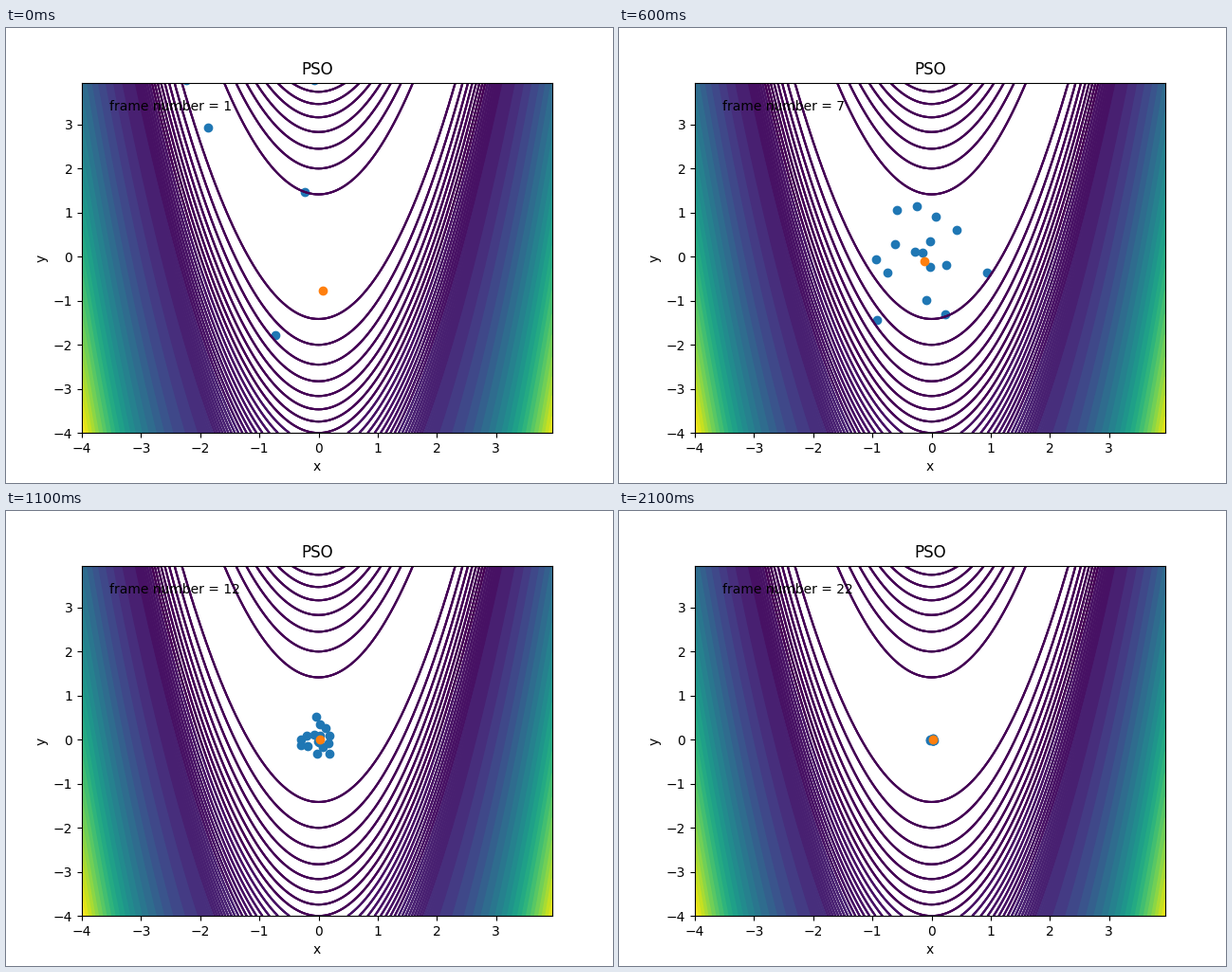
These frames come from a looping animation (640x480 px, 2200 ms). A matplotlib script:

```python
import matplotlib.pyplot as plt
import numpy as np
from matplotlib.animation import FuncAnimation

FRAMES, STEP_MS = 22, 100
SWARM = 16
INSIDE = [(-1.87, 2.93), (-.23, 1.46), (-.73, -1.78), (-2.24, 4.01), (-.07, 4.01)]

rng = np.random.default_rng(8)


def cost(x, y):
    return x**2 + 100 * (y - x**2)**2


def best_at(step):
    keys = [0, 4, 6, 9]
    return np.array([np.interp(step, keys, [.07, .25, -.12, .02]),
                     np.interp(step, keys, [-.77, -.02, -.10, 0])])


def start_swarm():
    # most particles begin outside the plot
    n = SWARM - len(INSIDE)
    angle = 2 * np.pi * (np.arange(n) + rng.random(n)) / n
    radius = rng.uniform(6, 10, n)
    ring = np.column_stack([radius * np.cos(angle), radius * np.sin(angle)])
    return np.vstack([INSIDE, ring])


offset = start_swarm() - best_at(0)
decay = rng.uniform([.70, .74], [.79, .82], (SWARM, 2))
swing = rng.uniform(1, 2.5, (SWARM, 2))


def swarm_at(step):
    """Every particle swings around the best point and settles on it."""
    return best_at(step) + offset * decay**step * np.cos(swing * step)


fig, ax = plt.subplots(figsize=(6.4, 4.8), dpi=100)
axis = np.arange(-4, 4, 0.05)
X, Y = np.meshgrid(axis, axis)
# stacked passes harden the line edges
for _ in range(3):
    ax.contour(X, Y, cost(X, Y), 200, cmap=plt.get_cmap("viridis", 24))
ax.set(title="PSO", xlabel="x", ylabel="y",
       xlim=(axis[0], axis[-1]), ylim=(axis[0], axis[-1]))

# the dots lie under the contour lines
swarm_dots = ax.scatter(*swarm_at(0).T, color="C0", zorder=1)
best_dot = ax.scatter(*best_at(0), color="C1", zorder=1)
label = ax.text(0.058, 0.92, "", transform=ax.transAxes)


def update(step):
    swarm_dots.set_offsets(swarm_at(step))
    best_dot.set_offsets([best_at(step)])
    label.set_text(f"frame number = {step + 1}")
    return swarm_dots, best_dot, label


anim = FuncAnimation(fig, update, frames=FRAMES, interval=STEP_MS,
                     repeat=True, repeat_delay=0)
plt.show()
```
